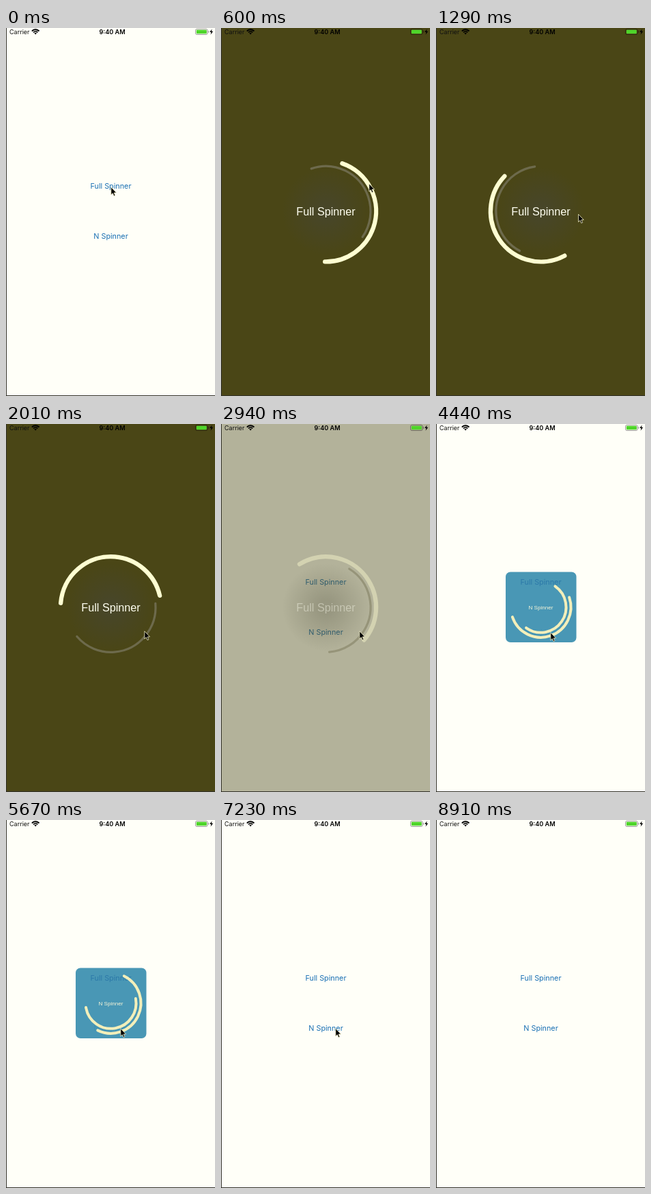
An HTML page with a canvas that plays this animation: 306 px wide and 536 px high, repeating every 8970 ms.

```html
<!DOCTYPE html>
<html lang="en">
<head>
<meta charset="utf-8">
<title>Spinners</title>
<style>
  html, body { margin: 0; width: 100%; height: 100%; overflow: hidden; background: #fffff8; }
  canvas { display: block; width: 306px; height: 536px; }
</style>
</head>
<body>
<canvas id="stage" width="306" height="536"></canvas>
<script>
const W = 306, H = 536, LOOP = 8970, STEP = 30;
const CX = 153.5, CY = 266.8;
const UI = 'Inter, "Open Sans", sans-serif';
const TITLE = '"Liberation Sans", Arial, sans-serif';
const SPEED = 0.3293; // degrees per ms
const ctx = document.getElementById('stage').getContext('2d');

const clamp = v => Math.max(0, Math.min(1, v));
const ease = v => v * v * (3 - 2 * v);
const ramp = (t, a, b) => ease(clamp((t - a) / (b - a)));
const visible = (t, inA, inB, outA, outB) => ramp(t, inA, inB) * (1 - ramp(t, outA, outB));

// Pointer stops: time, x, y
const route = [
  [0, 153, 231], [210, 153, 231], [570, 216, 226], [1020, 216, 226],
  [1500, 202, 301], [3210, 202, 301], [3570, 167, 303], [7260, 167, 303],
  [8100, 146, 492], [8790, -14, 260], [8970, -14, 260]
];

function pointerAt(t) {
  let i = 0;
  while (i < route.length - 2 && t >= route[i + 1][0]) i++;
  const [ta, xa, ya] = route[i], [tb, xb, yb] = route[i + 1];
  const k = ramp(t, ta, tb);
  return [xa + (xb - xa) * k, ya + (yb - ya) * k];
}

function text(s, x, y, font, color, align = 'center') {
  ctx.font = font;
  ctx.fillStyle = color;
  ctx.textAlign = align;
  ctx.textBaseline = 'alphabetic';
  ctx.fillText(s, x, y);
}

function arc(r, start, span, width, color) {
  const rad = Math.PI / 180;
  ctx.beginPath();
  ctx.arc(CX, CY, r, start * rad, (start + span) * rad);
  ctx.lineWidth = width;
  ctx.lineCap = 'round';
  ctx.strokeStyle = color;
  ctx.stroke();
}

function box(x, y, w, h, r) {
  ctx.beginPath();
  ctx.roundRect(x, y, w, h, r);
}

function shape(points, color) {
  ctx.beginPath();
  points.forEach(([x, y]) => ctx.lineTo(x, y));
  ctx.closePath();
  ctx.fillStyle = color;
  ctx.fill();
}

function page() {
  ctx.fillStyle = '#fffff8';
  ctx.fillRect(0, 0, W, H);
  text('Full Spinner', CX, 234, '10.8px ' + UI, '#1a70b4');
  text('N Spinner', CX, 307, '10.8px ' + UI, '#1a70b4');
}

function fullSpinner(t) {
  const a = visible(t, 210, 510, 2790, 3060);
  if (!a) return;
  ctx.save();
  ctx.globalAlpha = a;
  ctx.fillStyle = '#4a4616';
  ctx.fillRect(0, 0, W, H);
  const glow = ctx.createRadialGradient(CX, CY, 10, CX, CY, 64);
  glow.addColorStop(0, 'rgba(70,70,52,.6)');
  glow.addColorStop(1, 'rgba(70,70,52,0)');
  ctx.fillStyle = glow;
  ctx.fillRect(0, 0, W, H);
  const turn = 71 + SPEED * (t - 600);
  arc(65.5, 180 + turn, 144, 3.2, '#6d6a4c');
  arc(73.6, -turn, 162, 6.3, '#ffffd2');
  text('Full Spinner', CX, 273, '16.2px ' + TITLE, '#fffff0');
  ctx.restore();
}

function smallSpinner(t) {
  const a = visible(t, 3750, 4020, 6840, 7110);
  if (!a) return;
  ctx.save();
  ctx.globalAlpha = a;
  box(102, 215.5, 103.5, 102.5, 7);
  ctx.fillStyle = 'rgba(64,146,178,.95)';
  ctx.fill();
  text('Full Spinner', CX, 234, '10.8px ' + UI, 'rgba(32,104,164,.55)');
  const turn = SPEED * (t - 5670);
  arc(37, -10.5 + turn, 181, 4, '#f3efba');
  arc(44, -64 - turn, 180, 4, '#f3efba');
  text('N Spinner', CX, 269.8, '8.1px ' + TITLE, '#f8f6d8');
  ctx.restore();
}

function statusBar() {
  text('Carrier', 5, 9, '9px ' + UI, '#111', 'left');
  text('9:40 AM', 155.5, 9, '600 9.1px ' + UI, '#000');

  // Wi-Fi fan
  ctx.strokeStyle = '#000';
  ctx.lineCap = 'butt';
  [[7, 1.9], [4.1, 1.8]].forEach(([r, w]) => {
    ctx.beginPath();
    ctx.arc(43.2, 9.2, r, -Math.PI * 0.77, -Math.PI * 0.23);
    ctx.lineWidth = w;
    ctx.stroke();
  });
  ctx.beginPath();
  ctx.moveTo(43.2, 9.4);
  ctx.arc(43.2, 9.2, 2.3, -Math.PI * 0.77, -Math.PI * 0.23);
  ctx.fillStyle = '#000';
  ctx.fill();

  // Battery
  box(277.5, 1.5, 17.5, 8, 2);
  ctx.lineWidth = 0.9;
  ctx.strokeStyle = 'rgba(0,0,0,.42)';
  ctx.stroke();
  box(278.8, 2.7, 15, 5.6, 1);
  ctx.fillStyle = '#4fd52a';
  ctx.fill();
  ctx.fillStyle = 'rgba(0,0,0,.42)';
  ctx.fillRect(295.8, 4.2, 1, 2.6);
  shape([[301.6, 1.4], [298.2, 6.1], [300.4, 6.1], [299.6, 9.8], [303.2, 4.8], [300.9, 4.8]], '#000');
}

function frameEdge() {
  ctx.fillStyle = '#34332c';
  ctx.fillRect(0, 0, 1, H);
  ctx.fillRect(0, H - 1, W, 1);
}

function pointer(t) {
  const [x, y] = pointerAt(t);
  const arrow = [[0, 0], [0, 11.2], [2.5, 8.9], [4.2, 12.9], [6.1, 12.1], [4.4, 8.2], [7.8, 8.1]];
  ctx.save();
  ctx.translate(x + 0.8, y + 0.8);
  ctx.lineJoin = 'round';
  shape(arrow, '#000');
  ctx.lineWidth = 0.8;
  ctx.strokeStyle = '#f6f3cc';
  ctx.stroke();
  ctx.restore();
}

function draw(now) {
  const t = Math.floor((now % LOOP) / STEP) * STEP;
  page();
  fullSpinner(t);
  smallSpinner(t);
  statusBar();
  frameEdge();
  pointer(t);
}

const begin = performance.now();
function tick() {
  draw(performance.now() - begin);
  requestAnimationFrame(tick);
}
tick();
</script>
</body>
</html>
```
